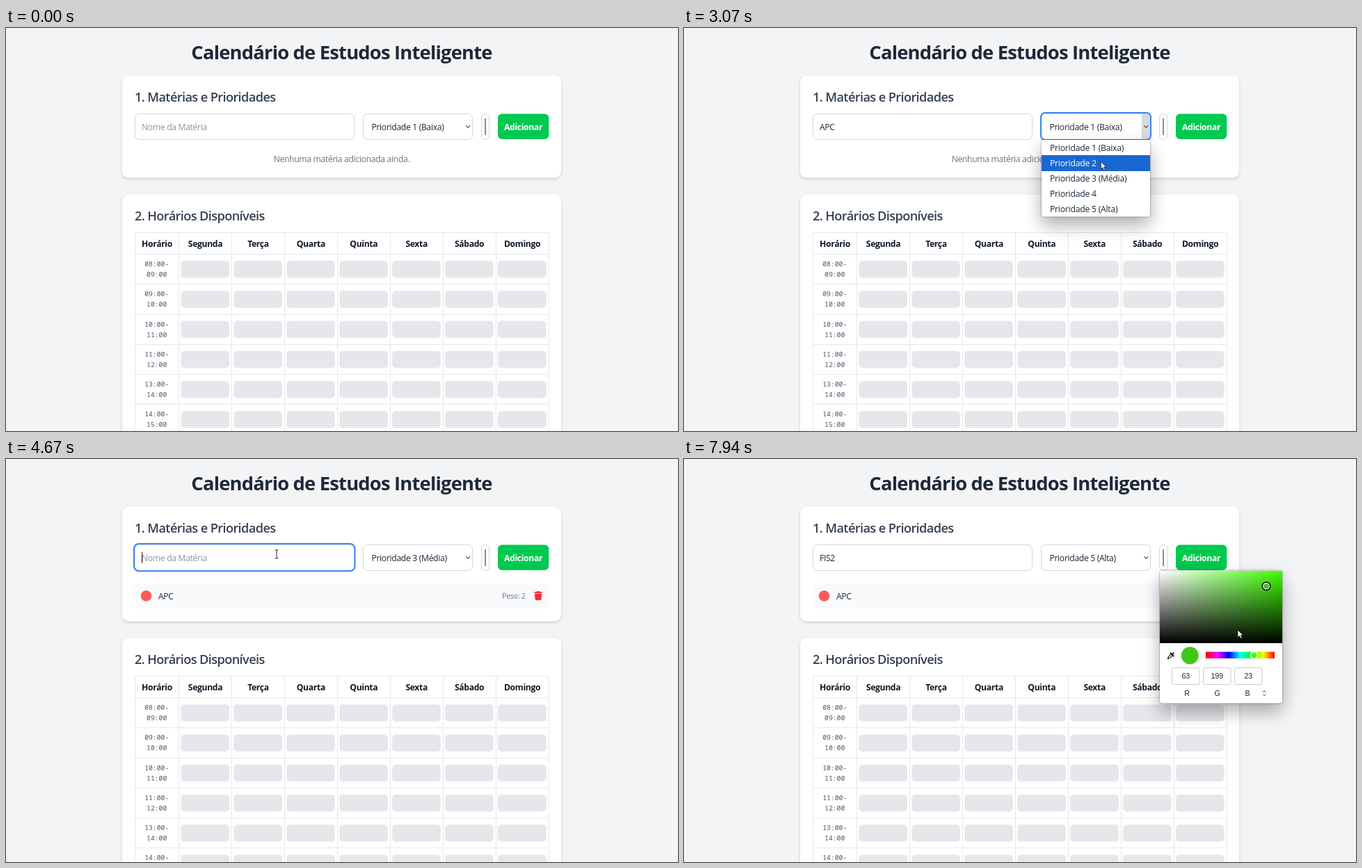
An HTML page that plays this animation: 966 px wide and 580 px high, repeating every 8000 ms.

```html
<!DOCTYPE html>
<html lang="pt-BR">
<head>
<meta charset="utf-8">
<title>Calendário de Estudos</title>
<style>
html, body { margin: 0; width: 100%; height: 100%; overflow: hidden; background: #f3f4f5; }
svg { display: block; width: 100%; height: 100%; }
text { font: 12.16px "Open Sans", "Noto Sans", sans-serif; letter-spacing: -.027em; fill: #1e2939; }
.title { font-size: 27.4px; font-weight: 700; letter-spacing: -.03em; }
.h2 { font-size: 18.2px; font-weight: 600; letter-spacing: -.034em; fill: #364153; }
.head { font-weight: 700; fill: #101828; }
.time { font: 9.75px "Noto Sans Mono", "DejaVu Sans Mono", monospace; letter-spacing: 0; fill: #4a5565; }
.gray { fill: #6a7282; }
.small { font-size: 10.6px; }
.medium { font-weight: 500; }
.option { letter-spacing: -.018em; }
.pick { font: 10.6px "Liberation Sans", sans-serif; letter-spacing: 0; fill: #222; }
.mid { text-anchor: middle; }
.end { text-anchor: end; }
.card { fill: #fff; filter: drop-shadow(0 2px 2px #00000024); }
.field { fill: #fff; stroke: #d1d5dc; }
.ring { fill: none; stroke: #3b82f6; stroke-width: 2; }
.popup { fill: #fff; filter: drop-shadow(0 12px 13px #00000038) drop-shadow(0 0 1px #0008); }
.line { fill: none; stroke: #e5e7eb; }
</style>
</head>
<body>
<svg id="stage" viewBox="0 0 966 580"></svg>
<script>
const text = (x, y, s, cls = '', attrs = '') => `<text x="${x}" y="${y}" class="${cls}" ${attrs}>${s}</text>`;
const rect = (x, y, w, h, rx, attrs) => `<rect x="${x}" y="${y}" width="${w}" height="${h}" rx="${rx}" ${attrs}/>`;
const path = (d, attrs) => `<path d="${d}" ${attrs}/>`;
const circle = (x, y, r, attrs) => `<circle cx="${x}" cy="${y}" r="${r}" ${attrs}/>`;
const group = (id, ...parts) => `<g id="${id}">${parts.join('')}</g>`;

const options = ['Prioridade 1 (Baixa)', 'Prioridade 2', 'Prioridade 3 (Média)', 'Prioridade 4', 'Prioridade 5 (Alta)'];
const days = ['Segunda', 'Terça', 'Quarta', 'Quinta', 'Sexta', 'Sábado', 'Domingo'];
const hours = [8, 9, 10, 11, 13, 14];
const clock = h => String(h).padStart(2, '0') + ':00';

function table() {
  const colX = i => 248.5 + i * 75.93, rowY = i => 325.5 + i * 43.25;
  let out = path('M185.5 580V294.5H780V580', 'class="line"') + text(217, 315, 'Horário', 'head mid');
  days.forEach((day, i) => {
    out += path(`M${Math.floor(colX(i)) + .5} 294.5V580`, 'class="line"') + text(colX(i) + 38, 315, day, 'head mid');
  });
  hours.forEach((h, r) => {
    const y = rowY(r);
    out += path(`M185 ${Math.floor(y) + .5}H780`, 'class="line"')
      + text(216.7, y + 17.5, clock(h) + '-', 'time mid') + text(216.7, y + 32.5, clock(h + 1), 'time mid');
    days.forEach((_, i) => out += rect(colX(i) + 3, y + 9.5, 69.5, 24.5, 5, 'fill="#e5e7eb"'));
  });
  return out;
}

function picker() {
  let out = rect(684, 160.5, 176, 191, 4, 'class="popup"')
    + rect(684, 161, 176, 104, 0, 'fill="url(#sat)"') + rect(684, 161, 176, 104, 0, 'fill="url(#dark)"')
    + circle(837, 183, 5, 'fill="#3fc717" stroke="#000" stroke-width="3"')
    + circle(837, 183, 4.3, 'fill="none" stroke="#fff" stroke-width="1.4"')
    + circle(727.3, 282.8, 12.5, 'fill="#3fc717"')
    + path('M695.5 287.5l1-3 4-4 2 2-4 4z', 'fill="#fff" stroke="#222" stroke-width="1.2"')
    + path('M699.5 279.5l4 4M701.5 281.5l2-2', 'stroke="#222" stroke-width="2.4" stroke-linecap="round"')
    + rect(750, 277.5, 99, 9.5, 0, 'fill="url(#hue)"')
    + circle(819.5, 282.5, 5, 'fill="#3cff00" stroke="#fff" stroke-width="1.6"');
  [[63, 'R'], [199, 'G'], [23, 'B']].forEach(([v, name], i) => {
    const x = 721.3 + i * 45;
    out += rect(x - 19.8, 300.5, 39.5, 24, 2, 'fill="#fff" stroke="#ccc"')
      + text(x, 316, v, 'pick mid') + text(723 + i * 43.5, 341, name, 'pick mid');
  });
  return out + path('M832.3 335.7l2-2 2 2M832.3 338.7l2 2 2-2', 'fill="none" stroke="#333"');
}

const hueStops = ['red', 'magenta', 'blue', 'cyan', 'lime', 'yellow', 'red']
  .map((c, i) => `<stop offset="${i / 6}" stop-color="${c}"/>`).join('');

stage.innerHTML = `<defs>
  <clipPath id="menuClip">${rect(514, 150, 156, 121.5, 4, '')}</clipPath>
  <linearGradient id="sat"><stop stop-color="#fff"/><stop offset="1" stop-color="hsl(106 100% 50%)"/></linearGradient>
  <linearGradient id="dark" x2="0" y2="1"><stop stop-color="#000" stop-opacity="0"/><stop offset="1"/></linearGradient>
  <linearGradient id="hue">${hueStops}</linearGradient></defs>`
  + text(482.5, 45, 'Calendário de Estudos Inteligente', 'title mid')
  + rect(167, 68.5, 631, 147, 9, 'class="card" id="card"')
  + text(185, 106, '1. Matérias e Prioridades', 'h2')
  + rect(185.5, 123.5, 315, 37, 6, 'class="field"')
  + rect(184, 122, 317.5, 39.3, 7, 'class="ring" id="inputRing"')
  + text(195, 146.5, 'Nome da Matéria', '', 'id="hint" style="fill:#8f9297"')
  + text(195, 146.5, '', '', 'id="value"')
  + path('M0 134V150', 'id="caret" stroke="#222"')
  + rect(513.5, 123.5, 157, 37, 6, 'class="field"')
  + rect(658, 124, 12.5, 36, 1, 'id="arrowBox" fill="#d9d9d9"')
  + rect(513, 122, 158, 39, 6, 'class="ring" id="selectRing"')
  + path('M661.3 140.5l2.9 2.8 2.9-2.8', 'fill="none" stroke="#444" stroke-width="1.1"')
  + text(525.5, 147, '', '', 'id="choice"')
  + rect(683.5, 123.8, 11, 36.4, 4.5, 'class="field"')
  + rect(688.3, 130, 1.5, 24, 0, 'fill="#666"')
  + rect(707, 123.5, 73.3, 36.5, 6, 'id="button"')
  + text(743.6, 146.5, 'Adicionar', 'head mid', 'style="fill:#fff"')
  + text(482.5, 192.5, 'Nenhuma matéria adicionada ainda.', 'gray mid', 'id="empty"')
  + group('item',
    rect(185, 179, 595, 36, 6, 'fill="#f9fafb"'),
    circle(201.5, 197, 7.8, 'fill="#fb5b5b"'),
    text(219, 201.5, 'APC', 'medium'),
    text(746.5, 201, 'Peso: 2', 'gray small end'),
    path('M759.3 191.3h3.2l.8-1h3.6l.8 1h3.2v1.6h-11.6zM760 193.8h10.2l-.6 8q-.1 1.4-1.5 1.4h-6q-1.4 0-1.5-1.4z', 'fill="#fb2c36"'))
  + group('schedule',
    rect(167, 239.5, 631, 420, 9, 'class="card"'),
    text(185, 277, '2. Horários Disponíveis', 'h2'), table())
  + group('menu',
    rect(514, 161, 156, 110.5, 4, 'class="popup"'),
    rect(514, 0, 156, 23, 0, 'id="mark" fill="#1967d2" clip-path="url(#menuClip)"'),
    ...options.map((o, i) => text(526, 177 + i * 22, o, 'option')))
  + group('picker', picker())
  + group('pointer',
    circle(-.5, .8, 9, 'id="click" fill="#e6e600" opacity=".65"'),
    path('M0 0V10.8L2.5 8.5 4.3 12.4 6.1 11.6 4.4 7.8H7.7Z', 'id="arrow" fill="#fff" stroke="#222" stroke-width=".9"'),
    path('M-2.3 -6H2.3M0 -6V6M-2.3 6H2.3', 'id="beam" fill="none" stroke="#222"'));

const el = Object.fromEntries([...stage.querySelectorAll('[id]')].map(e => [e.id, e]));
const rows = [...stage.querySelectorAll('.option')];

// Everything the page does, as changes to its state
const events = [
  [0, { word: '', choice: 0 }],
  [600, { focus: 'input' }],
  [1190, { word: 'A' }], [1390, { word: 'AP' }], [1540, { word: 'APC' }],
  [2730, { focus: 'select', open: true }],
  [3280, { open: false, choice: 1 }],
  [3740, { focus: 'button' }],
  [3870, { word: '', choice: 2, added: true }],
  [4400, { focus: 'input' }],
  [5070, { word: 'F' }], [5270, { word: 'FI' }], [5340, { word: 'FIS' }], [5890, { word: 'FIS2' }],
  [6540, { focus: 'select', open: true }],
  [7145, { open: false, choice: 4 }],
  [7540, { focus: 'picker' }]
];

// Pointer legs: start, end, x, y; it rests in between
const legs = [
  [60, 600, 301, 134], [680, 800, 290, 138], [1850, 2130, 1000, 10], [2230, 2650, 590, 147],
  [2730, 3140, 600, 196], [3280, 3720, 754, 147], [3980, 4400, 412, 128], [4480, 4670, 389, 137],
  [5800, 6080, 750, 74], [6080, 6400, 582, 146], [6600, 6940, 617, 252],
  [7150, 7450, 689, 146], [7640, 7870, 702, 170], [7870, 7940, 796, 246]
];
const clicks = [560, 2650, 3170, 3750, 4390, 6450, 7060, 7460];

const ease = f => f * f * (3 - 2 * f);
const show = (e, on) => e.style.display = on ? '' : 'none';

function stateAt(t) {
  const state = {};
  for (const [at, change] of events) {
    if (at > t) break;
    Object.assign(state, change, { since: at });
  }
  return state;
}

function pointerAt(t) {
  let x = 960, y = 600;
  for (const [from, to, toX, toY] of legs) {
    const f = ease(Math.min(1, Math.max(0, (t - from) / (to - from))));
    x += (toX - x) * f;
    y += (toY - y) * f;
  }
  return [x, y];
}

function draw(t) {
  const { word, choice, focus, open, added, since } = stateAt(t);
  const [x, y] = pointerAt(t);
  const over = (x0, x1) => x > x0 && x < x1 && y > 123 && y < 161;

  show(el.inputRing, focus === 'input');
  show(el.selectRing, focus === 'select');
  show(el.hint, !word);
  el.value.textContent = word;
  show(el.caret, focus === 'input' && (t - since) % 1060 < 530);
  const caretX = 195 + (word && el.value.getComputedTextLength());
  el.caret.setAttribute('transform', `translate(${Math.round(+caretX) + .5} 0)`);

  el.choice.textContent = options[choice];
  show(el.arrowBox, open || over(513, 671));
  el.button.setAttribute('fill', over(707, 780) ? '#00a63e' : '#00c950');

  show(el.empty, !added);
  show(el.item, added);
  el.card.setAttribute('height', added ? 165 : 147);
  el.schedule.setAttribute('transform', `translate(0 ${added ? 18.2 : 0})`);

  const row = y > 161 ? Math.min(4, Math.floor((y - 161) / 22)) : choice;
  show(el.menu, open);
  el.mark.setAttribute('y', 161 + row * 22);
  rows.forEach((r, i) => r.style.fill = i === row ? '#fff' : '');
  show(el.picker, focus === 'picker');

  const beam = over(185, 501);
  el.pointer.setAttribute('transform', `translate(${x} ${y})`);
  show(el.click, clicks.some(c => t >= c && t < c + 90));
  show(el.beam, beam);
  show(el.arrow, !beam);
}

const start = performance.now();
function tick() {
  draw((performance.now() - start) % 8000);
  requestAnimationFrame(tick);
}
tick();
</script>
</body>
</html>
```
